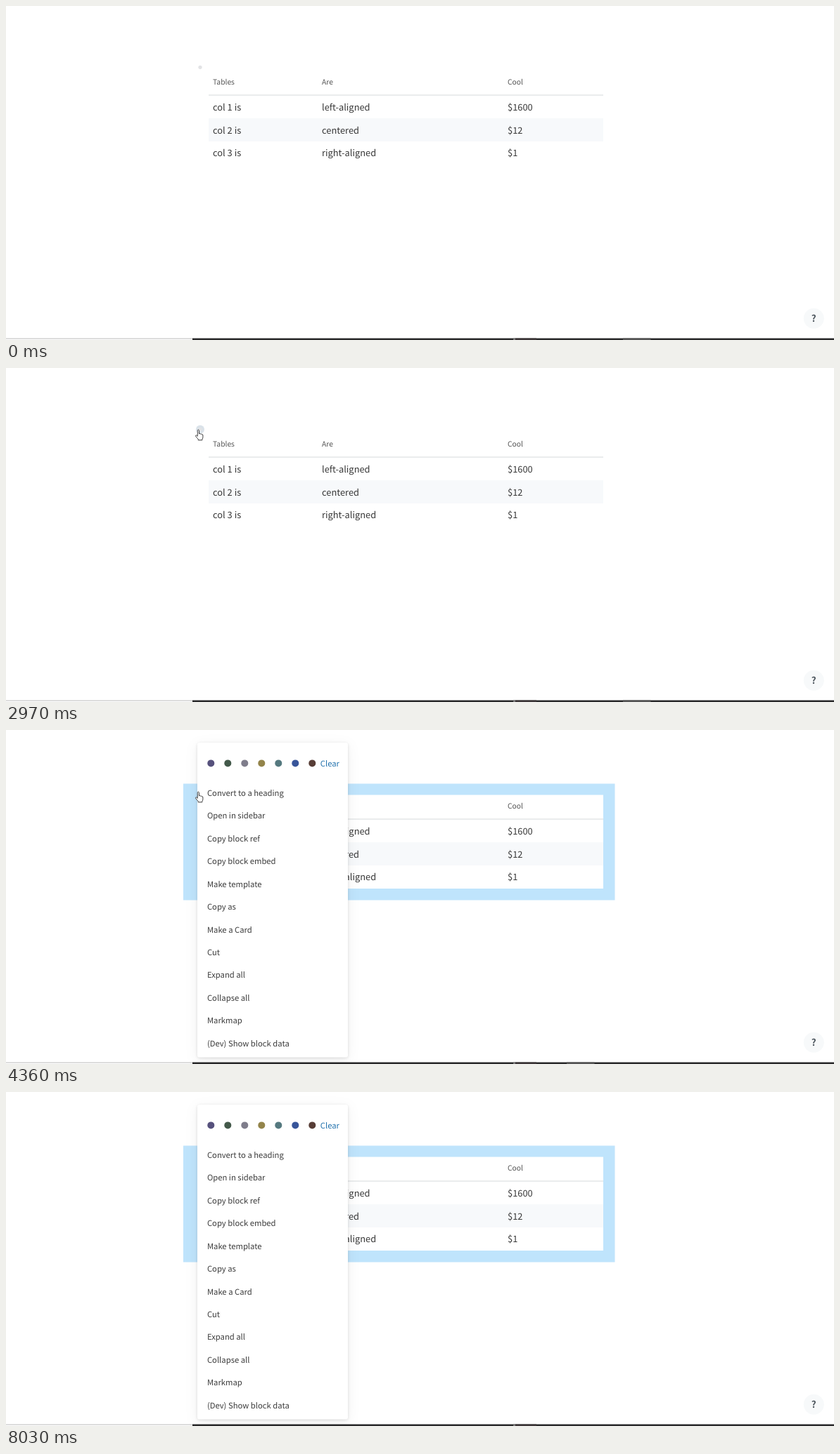
An HTML page that plays this animation: 1177 px wide and 476 px high, repeating every 8080 ms.

```html
<!DOCTYPE html>
<html lang="en">
<head>
<meta charset="utf-8">
<title>Block menu on a table</title>
<style>
  html, body { margin: 0; width: 100%; height: 100%; overflow: hidden; background: #fff; }
  svg { display: block; }
  text {
    font-family: "Noto Sans CJK SC", "Noto Sans CJK JP", "Noto Sans CJK", "Open Sans", sans-serif;
    font-size: 12.88px; fill: #383838; text-rendering: geometricPrecision; white-space: pre;
  }
  .head { font-size: 10.3px; fill: #555; }
  #menu text { font-size: 11.27px; fill: #3c3c3c; }
  #menu #clear { fill: #2272ad; }
  #panel { filter: drop-shadow(0 1px 2px rgba(0,0,0,.13)) drop-shadow(0 4px 9px rgba(0,0,0,.06)); }
  #help { font-size: 13.4px; font-weight: 700; fill: #4d565e; text-anchor: middle; }
  #cursor path { fill: #fff; stroke: #333; stroke-width: .95; stroke-linejoin: round; }
  #cursor #beam { fill: none; stroke: #555; }
</style>
</head>
<body>
<svg width="1177" height="476" viewBox="0 0 1177 476">
  <g id="selection">
    <rect x="252" y="76.5" width="613.5" height="166" fill="#bfe4fc"/>
    <rect x="288" y="92.5" width="561" height="133.5" fill="#fff"/>
  </g>
  <circle id="halo" cx="276" cy="87.5" r="6" fill="#dae2e9"/>
  <circle cx="276" cy="87.3" r="2.6" fill="#e2e3e5"/>
  <rect x="288" y="160" width="561" height="33" fill="#f7f9fb"/>
  <rect x="288" y="126.3" width="561" height="1.4" fill="#e1e4e6"/>
  <g id="table"></g>

  <rect y="473.3" width="265" height="1.6" fill="#d4d4d4"/>
  <rect x="265" y="473.5" width="912" height="2.5" fill="#2a2a2b"/>
  <rect x="721" y="473.5" width="3" height="2.5" fill="#777"/>
  <rect x="724" y="473.5" width="30" height="2.5" fill="#3d3638"/>
  <rect id="task" y="473.5" width="39.5" height="2.5" fill="#555"/>

  <circle cx="1148.3" cy="445.3" r="14.5" fill="#f7f9fa"/>
  <text id="help" x="1148.3" y="450">?</text>

  <g id="menu">
    <rect id="panel" x="272" y="18" width="214" height="448.5" rx="3" fill="#fff"/>
    <g id="items"></g>
    <text id="clear" x="446.8" y="51.8">Clear</text>
  </g>

  <g id="cursor">
    <path id="arrow" d="M0 0V10.3L2.4 8.1L4.1 12L5.8 11.3L4.1 7.5H7.2Z"/>
    <path id="hand" d="M-1.1 8.7V1.5Q-1.1 .1 0 .1T1.1 1.5V5.8Q2.7 4.8 3.2 6.1Q4.6 5.5 5 6.7Q6.5 6.3 6.5 8V10.6Q6.5 12.2 5.5 13.2V14.8H-.2V13.5Q-2 11.5-3.7 9.3Q-4.2 8-3 7.7Q-2 8-1.1 9.3Z"/>
    <path id="beam" d="M-3-5.5Q0-5.5 0-4V4Q0 5.5-3 5.5M3-5.5Q0-5.5 0-4M0 4Q0 5.5 3 5.5"/>
  </g>
</svg>
<script>
const LOOP = 8080;
const $ = id => document.getElementById(id);
const label = (x, y, s, cls = '') => `<text x="${x}" y="${y}" class="${cls}">${s}</text>`;

const columns = [294, 449, 713];
const rows = [
  ['Tables', 'Are', 'Cool'],
  ['col 1 is', 'left-aligned', '$1600'],
  ['col 2 is', 'centered', '$12'],
  ['col 3 is', 'right-aligned', '$1'],
];
$('table').innerHTML = rows.map((row, r) => row.map((s, c) =>
  label(columns[c], r ? 116.2 + 32.7 * r : 112.4, s, r ? '' : 'head')).join('')).join('');

const swatches = ['#56517c', '#43594a', '#7f7d8b', '#93844a', '#55797f', '#38559a', '#573d36'];
const items = ['Convert to a heading', 'Open in sidebar', 'Copy block ref', 'Copy block embed',
  'Make template', 'Copy as', 'Make a Card', 'Cut', 'Expand all', 'Collapse all', 'Markmap',
  '(Dev) Show block data'];
$('items').innerHTML =
  swatches.map((c, i) => `<circle cx="${291.3 + 24 * i}" cy="47.4" r="5" fill="${c}"/>`).join('') +
  items.map((s, i) => label(285.9, 94 + 32.42 * i, s)).join('');

// Pointer path: time, x, y, shape from that time on
const path = [
  [0, 640, -8, 'beam'], [50, 640, -8, 'beam'], [300, 470, 27, 'beam'], [560, 365, 50, 'beam'],
  [810, 322, 58, 'beam'], [860, 312, 61, 'arrow'], [1040, 279.5, 71, 'arrow'],
  [1300, 273, 84, 'hand'], [1490, 272.6, 89.5, 'hand'], [1840, 272.6, 89.5, 'hand'],
  [1940, 273.4, 88.7, 'hand'], [2260, 273.4, 88, 'hand'], [4360, 273.4, 88, 'hand'],
  [4460, 270.5, 95, 'arrow'], [4560, 268.5, 99, 'arrow'], [5020, 268.5, 99, 'arrow'],
  [5220, 267.3, 106, 'arrow'], [5430, 264.8, 125, 'arrow'], [5850, 264.8, 125, 'arrow'],
  [5930, 300, 117, 'hand'], [6090, 460, 78, 'arrow'], [6160, 525, 62, 'beam'],
  [6410, 720.5, 13.5, 'beam'], [6610, 739, 4.5, 'beam'], [6660, 739, -2.5, 'beam'],
  [7115, 739, -2.5, 'beam'], [7120, 739, -20, 'beam'], [LOOP, 739, -20, 'beam'],
];

const clamp = v => Math.max(0, Math.min(1, v));
const show = (id, on) => $(id).style.display = on ? '' : 'none';

function draw(t) {
  const i = path.findIndex(p => p[0] > t) - 1;
  const [t0, x0, y0, shape] = path[i], [t1, x1, y1] = path[i + 1];
  const k = (t - t0) / (t1 - t0);
  $('cursor').setAttribute('transform', `translate(${x0 + (x1 - x0) * k} ${y0 + (y1 - y0) * k})`);
  for (const id of ['arrow', 'hand', 'beam']) show(id, id === shape);

  $('selection').style.opacity = 1 - (1 - clamp((t - 2980) / 170)) ** 2;
  $('menu').style.opacity = clamp((t - 3000) / 70);
  $('clear').style.fill = t < 3170 ? '#3a6d8f' : '';
  show('halo', t >= 2770 && t < 3070);
  show('task', t < 8030);
  $('task').setAttribute('x', t < 3030 ? 877 : 797);
}

function tick() {
  draw(performance.now() % LOOP);
  requestAnimationFrame(tick);
}
tick();
</script>
</body>
</html>
```
